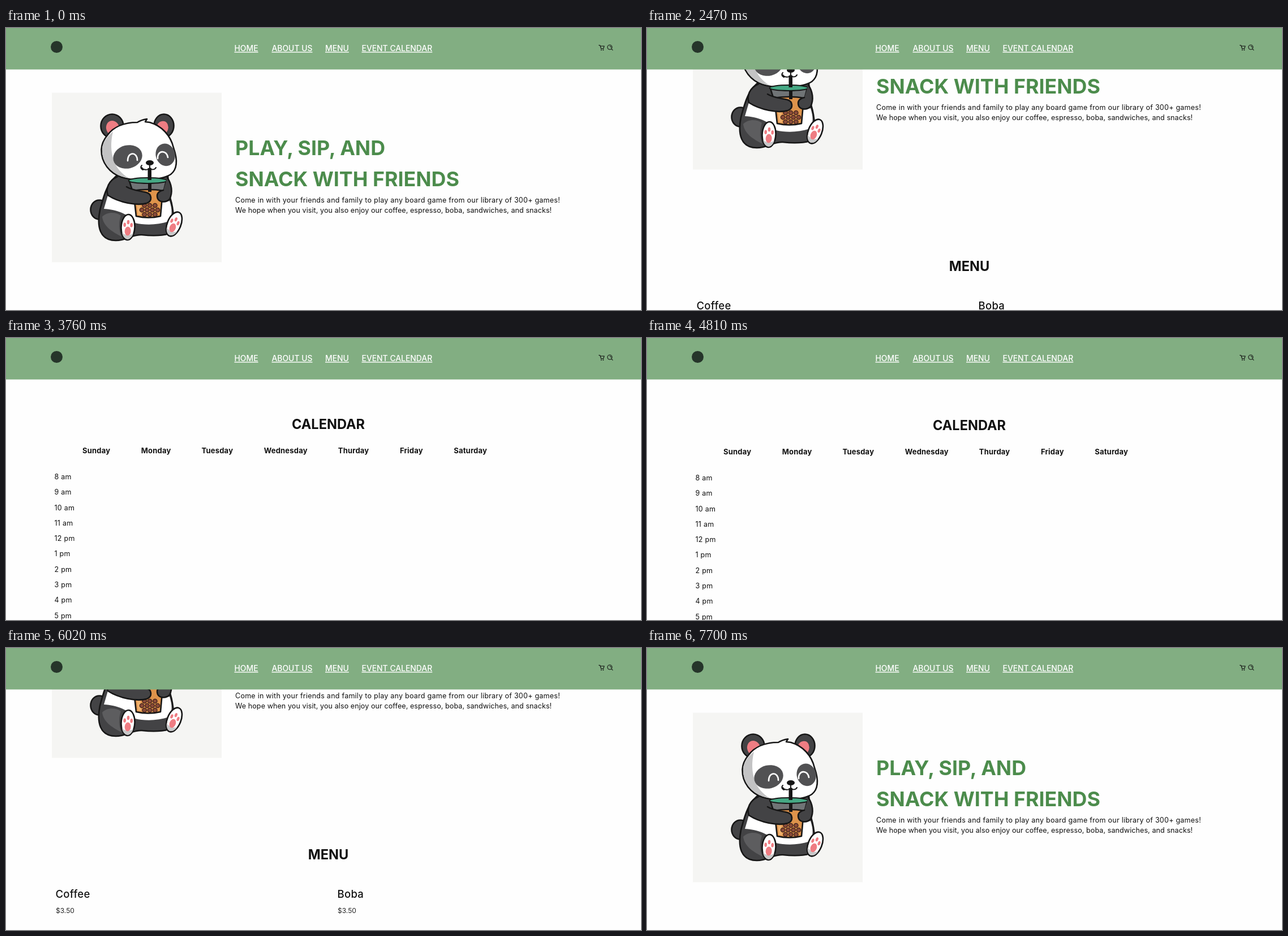
These frames come from a looping animation (1122 by 499 pixels, 8.05 s). An HTML page:

```html
<!DOCTYPE html>
<html lang="en">
<head>
<meta charset="utf-8">
<title>Board game cafe</title>
<style>
  html, body { margin: 0; width: 100%; height: 100%; overflow: hidden; background: #fefefe; }
  svg { display: block; }
  text { font-family: Inter, "Open Sans", sans-serif; font-optical-sizing: none; fill: #111; white-space: pre; }
  .nav { font-size: 13.9px; font-weight: 500; fill: #fff; text-decoration: underline; text-decoration-thickness: 1px; text-underline-offset: 2px; }
  .hero { font-size: 35.8px; font-weight: 700; fill: #4c8c4c; }
  .copy { font-size: 12.5px; letter-spacing: .25px; }
  .tight { letter-spacing: .1px; }
  .title { font-size: 23.6px; font-weight: 700; text-anchor: middle; }
  .item { font-size: 18.5px; font-weight: 500; letter-spacing: .3px; }
  .price { font-size: 12px; fill: #222; }
  .day { font-size: 13px; font-weight: 700; letter-spacing: .2px; }
  .ink { stroke: #161616; stroke-width: 2.6; stroke-linejoin: round; stroke-linecap: round; }
  .thin { stroke-width: 2; }
  .fur { fill: #434345; }
  .white { fill: #fff; }
  .pink { fill: #ef7d83; }
  .none { fill: none; }
  .icon { fill: none; stroke: #111; stroke-width: 1.1; stroke-linecap: round; stroke-linejoin: round; }
</style>
</head>
<body>
<svg width="1122" height="499" viewBox="0 0 1122 499">
  <rect width="1122" height="499" fill="#fefefe"/>

  <g id="page">
    <rect x="81" y="114.5" width="300" height="300" fill="#f5f5f3"/>

    <!-- tail and ears -->
    <ellipse class="fur ink" cx="165" cy="321.5" rx="15.5" ry="17"/>
    <ellipse class="fur ink" cx="187.5" cy="173.5" rx="20" ry="21"/>
    <ellipse class="pink" cx="188.500" cy="177.500" rx="11.5" ry="13.5" transform="rotate(-18 188 177)"/>
    <ellipse class="fur ink" cx="279" cy="173" rx="17.5" ry="20.5"/>
    <ellipse class="pink" cx="276" cy="177" rx="10.5" ry="12.5" transform="rotate(18 276 177)"/>

    <!-- body -->
    <path class="fur ink" d="M200 258C178 272 172 300 166 322C160 352 166 376 194 376C214 376 222 365 240 366C258 368 274 368 288 364C300 350 296 320 290 300L286 262Z"/>
    <path class="white" d="M180 296C200 306 225 312 245 312L289 306C294 322 294 332 288 342C268 349 245 349 228 345C218 330 196 321 173 320Z"/>
    <path fill="#5d5d5f" d="M170 334C178 325 194 325 203 332C199 344 199 358 204 369C186 360 172 350 170 334Z"/>

    <!-- head -->
    <path class="white ink" d="M179 190C191 173 212 167 232 167C238 163 243 162 249 161L246 166L254 167C275 173 291 190 296 212C303 232 304 249 291 259C276 269 228 272 204 264C184 257 168 239 168.5 215C169 205 173 197 179 190Z"/>
    <path fill="#c3c3c4" d="M180 192C174 199 170 207 170 216C170 239 185 256 206 263L216 265C192 251 180 222 189 183Z"/>
    <ellipse fill="#515153" cx="215" cy="228" rx="26" ry="20.5" transform="rotate(-14 215 228)"/>
    <ellipse fill="#515153" cx="281.500" cy="224.500" rx="17" ry="20" transform="rotate(-14 281 224)"/>
    <path class="none" stroke="#fff" stroke-width="2.6" stroke-linecap="round" d="M215 235C215 218 232 219 232 234M268 231C267 216 284 215 286 229"/>
    <ellipse fill="#161616" cx="254" cy="238.500" rx="7" ry="4.500"/>
    <path class="none ink thin" d="M254 243V248M240 247C243 252 252 252 254 247C256 252 263 251 265 247M240 243C237 246 238 249 242 251"/>

    <!-- drink -->
    <path class="ink" fill="#707476" d="M218 271H283L278 290H224Z"/>
    <path class="ink" fill="#de934b" d="M225 288C240 285 262 285 277 288L273 333C260 336 243 336 230 333Z"/>
    <path fill="#f0b16d" d="M229 291L236 290L239 331L233 331Z"/>
    <g id="pearls" fill="#8a4b38" stroke="#3b201b" stroke-width="1.3"></g>
    <ellipse class="ink thin" fill="#46a985" cx="250.5" cy="270" rx="34" ry="5"/>
    <path fill="#161616" d="M250.5 248H257V269H250.5ZM251 275H257V290H251Z"/>

    <!-- arms and feet -->
    <path class="fur ink" d="M197 263C181 270 176 284 180 296C200 309 231 315 249 310C259 306 258 294 248 291C236 288 222 287 213 281"/>
    <path class="fur ink" d="M285 265C293 276 295 291 289 303C282 310 271 308 268 302C265 294 269 289 278 287"/>
    <g id="footL"></g>
    <g id="footR"></g>

    <text class="hero" x="405" y="225">PLAY, SIP, AND</text>
    <text class="hero" x="405" y="279.5">SNACK WITH FRIENDS</text>
    <text class="copy" x="405" y="309">Come in with your friends and family to play any board game from our library of 300+ games!</text>
    <text class="copy tight" x="405" y="327.3">We hope when you visit, you also enjoy our coffee, espresso, boba, sandwiches, and snacks!</text>

    <text class="title" x="569.5" y="593.5">MENU</text>
    <text class="item" x="87.5" y="662">Coffee</text>
    <text class="item" x="585.5" y="662">Boba</text>
    <text class="price" x="88" y="689">$3.50</text>
    <text class="price" x="586" y="689">$3.50</text>

    <text class="title" x="569.5" y="789.5">CALENDAR</text>
    <text class="day" id="days" x="135" y="832.5"></text>
    <g id="hours"></g>
  </g>

  <g id="header">
    <rect width="1122" height="73.4" fill="#82ae82"/>
    <circle cx="89.5" cy="33.5" r="10.5" fill="#26352a"/>
    <text class="nav" x="403.5" y="41">HOME</text>
    <text class="nav" x="469.5" y="41">ABOUT US</text>
    <text class="nav" x="564" y="41">MENU</text>
    <text class="nav" x="628.5" y="41">EVENT CALENDAR</text>
    <path class="icon" d="M1047.5 30.5H1049.5L1051.5 36.5H1055.5L1057 32H1050"/>
    <circle cx="1051.8" cy="38.7" r="1" fill="#111"/>
    <circle cx="1055.3" cy="38.7" r="1" fill="#111"/>
    <path class="icon" d="M1069.8 37.2L1072 39.2M1067 32.2A2 2 0 0 1 1069 34.2"/>
    <circle class="icon" cx="1066.8" cy="34" r="4"/>
  </g>

  <path id="pointer" d="M.5 .5V12L3.2 9.5L5 13.500L6.8 12.7L5 8.8H8.5Z" fill="#fff" stroke="#111" stroke-width=".9"/>
</svg>

<script>
  const LOOP = 8050;
  const TICK = 70;
  const NS = 'http://www.w3.org/2000/svg';
  const byId = id => document.getElementById(id);

  function add(parent, tag, attrs, label) {
    const node = document.createElementNS(NS, tag);
    for (const key in attrs) node.setAttribute(key, attrs[key]);
    if (label) node.textContent = label;
    parent.append(node);
  }

  function buildCalendar() {
    'Sunday Monday Tuesday Wednesday Thurday Friday Saturday'.split(' ')
      .forEach((day, i) => add(byId('days'), 'tspan', { dx: i ? 54.5 : 0 }, day));
    for (let h = 8; h <= 17; h++) {
      const label = `${(h - 1) % 12 + 1} ${h < 12 ? 'am' : 'pm'}`;
      add(byId('hours'), 'text', { class: 'copy', x: 85.5, y: 879 + (h - 8) * 27.28 }, label);
    }
  }

  function buildPearls() {
    for (let row = 0; row < 3; row++) {
      const count = 3 + row % 2;
      for (let i = 0; i < count; i++)
        add(byId('pearls'), 'circle', { cx: 254 + (i - (count - 1) / 2) * 9.3, cy: 314 + row * 8, r: 3.7 });
    }
  }

  function buildFoot(id, x, y, turn) {
    const foot = byId(id);
    const oval = (cx, cy, rx, ry, cls) => add(foot, 'ellipse', { cx, cy, rx, ry, class: cls });
    foot.setAttribute('transform', `translate(${x} ${y}) rotate(${turn})`);
    oval(0, 0, 12, 22.5, 'white ink');
    add(foot, 'path', { d: 'M-10 10C-4 15 4 15 10 10C8 18 4 21 0 21C-4 21 -8 18 -10 10Z', fill: '#c8c8c9' });
    oval(0, 7, 5.5, 8, 'pink');
    for (const side of [-1, 0, 1]) oval(side * 6, -9 + Math.abs(side) * 5, 2.3, 3.8, 'pink');
  }

  // Slow start, soft landing
  const ease = p => p * p / (p * p + 0.8 * (1 - p) ** 2);

  // Turns flicks [start, end, scroll] into one row per screen update
  function glide(flicks) {
    const rows = [[0, 0, 0]];
    let top = 0;
    for (const [start, end, goal] of flicks) {
      const gaps = Math.round((end - start) / TICK);
      for (let i = 0; i <= gaps; i++) {
        const p = ease((i + 1) / (gaps + 1));
        rows.push([start + (end - start) * i / gaps, 0, -Math.round(top + (goal - top) * p)]);
      }
      top = goal;
    }
    return rows;
  }

  // Holds each place until the next row: [ms, x, y]
  function play(node, rows) {
    const frames = rows.map(([ms, x, y]) => ({
      offset: ms / LOOP, transform: `translate(${x}px, ${y}px)`, easing: 'step-end'
    }));
    frames.push({ ...frames[frames.length - 1], offset: 1 });
    node.animate(frames, { duration: LOOP, iterations: Infinity });
  }

  const flicks = [
    [1930, 2140, 78], [2400, 2600, 233], [2800, 2940, 300], [3200, 3410, 475], [3610, 3760, 629],
    [4810, 5020, 611], [5290, 5360, 557], [5620, 5830, 251], [6020, 6160, 120], [6360, 6430, 0]
  ];

  const AWAY = [-40, -40];
  const pointer = [
    [0, ...AWAY], [180, 1081, 464], [250, 1100, 360], [320, 1113, 266], [600, 1113, 212],
    [670, ...AWAY], [7360, 1113, 479], [7430, ...AWAY], [7630, 1107, 485], [7700, ...AWAY]
  ];

  buildCalendar();
  buildPearls();
  buildFoot('footL', 215.5, 352.5, 3);
  buildFoot('footR', 297, 347, 22);
  play(byId('page'), glide(flicks));
  play(byId('pointer'), pointer);
</script>
</body>
</html>
```
